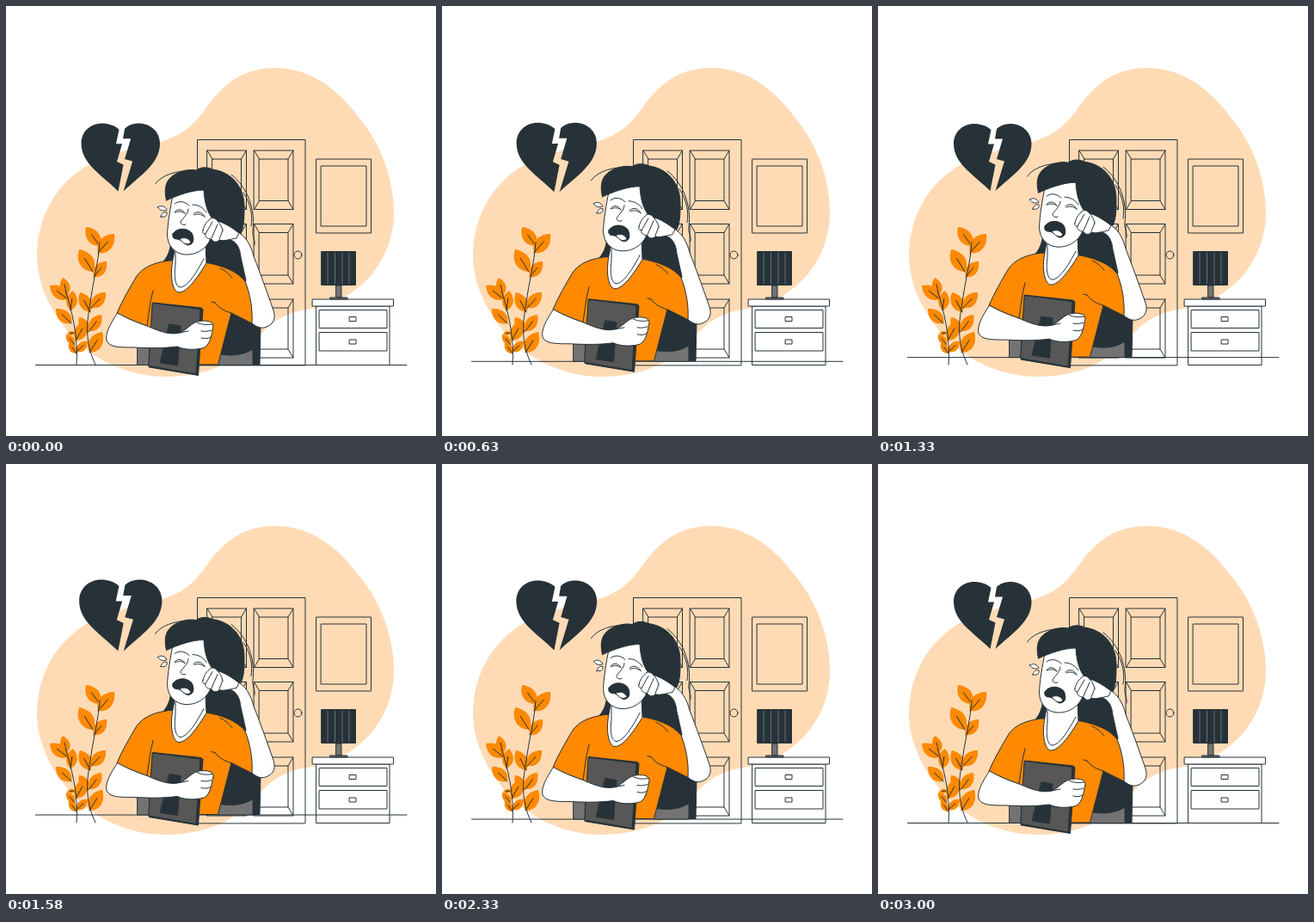
Write an HTML page that moves like this. It is 500x500 px and loops after 3.04 s.

```html
<!DOCTYPE html>
<html lang="en">
<head>
<meta charset="utf-8">
<title>Heartbroken</title>
<style>
  html, body { margin: 0; width: 100%; height: 100%; overflow: hidden; background: #fff; }
  svg { display: block; width: 100%; height: 100%; }
  .ln { fill: none; stroke: #263238; stroke-width: 1; stroke-linecap: round; stroke-linejoin: round; }
  .w { fill: #fff; }
  .o { fill: #ff8900; }
  .d { fill: #263238; }
  .g { fill: #737373; }
</style>
</head>
<body>
<svg viewBox="0 0 500 500">
  <path fill="#ffdbb5" d="M313 72C268 72 247 99 231 121C213 146 196 154 171 160C140 167 112 175 90 188C54 212 36 250 36 291C36 326 56 363 82 389C109 416 149 431 184 431C222 431 250 421 270 406C299 383 306 360 350 353C412 344 451 295 451 240C451 204 438 163 410 129C383 93 351 72 313 72Z"/>

  <g id="door" class="ln">
    <path d="M222.5 417.5V155.5H348V417.5Z"/>
    <circle cx="339.5" cy="289.5" r="4.5"/>
  </g>

  <g class="ln">
    <path d="M361 178H424.5V264H361ZM366.500 186H419V256H366.500Z"/>
    <path class="w" d="M361 349H446V417.500H361Z"/>
    <path class="w" d="M356.500 341H450.500V349H356.500Z"/>
    <path class="w" d="M364.500 353.500H443V374.500H364.500ZM364.500 379.500H443V401H364.500Z"/>
    <path d="M399.500 361.500H407V366.500H399.500ZM399.500 388H407V393H399.500Z"/>
    <path class="g" d="M384 325H390V339H384ZM377 339H397V341H377Z"/>
    <path class="d" d="M367 285.500H406.500V324.500H367Z"/>
    <path stroke="#607078" style="stroke:#607078" d="M374 287V323M382.500 287V323M391 287V323M399 287V323"/>
  </g>

  <g id="plants"></g>

  <g id="heart" class="d">
    <path d="M131.500 144C126 139 119 137 112 137C98 137 88 147 88 160C88 183 110 195 130.500 215L136.500 184.500L129 181L135 160.500H128Z"/>
    <path d="M138 143C142 139 148 137 154 137C168 137 178.500 147 178.500 160C178.500 183 157 196 136.500 215L147 180.500L138 178L145 154.500H136Z"/>
  </g>

  <g id="woman" class="ln">
    <path d="M34.500 417.500H466"/>
    <!-- chair -->
    <path class="g" d="M153 394L167 390V417.500H153Z"/>
    <path class="d" d="M262 356L296 372L295 417H287V399C277 406 260 408 246 404Z"/>
    <path class="g" d="M246 404C260 408 277 406 287 399V417.500H246Z"/>
    <!-- hair behind -->
    <path class="d" d="M192 268C192 282 189 290 183 297L198 300L197 276Z"/>
    <path class="d" d="M230 250L274 255C268 272 270 285 277 300C280 308 281 316 279 322L229 301Z"/>
    <!-- raised forearm -->
    <path class="w" d="M258 271C268 273 272 281 273 292L279 319L262 352L284 367C290 373 297 376 303 373C311 370 314 363 311 354C303 331 295 309 288 291C285 279 279 267 268 262Z"/>
    <!-- shirt -->
    <path class="o" d="M190 296C172 298 159 304 152 314C143 329 135 343 129 357C140 363 152 368 164 372L168 417H246.500L262 357L286 369C287 352 284 335 278 320C269 308 250 301 230 298Z"/>
    <path d="M243 345C248 352 255 355 262 357M243 345L239 344M164 372C166 359 167 345 171 331M263 316C258 310 254 307 249 305"/>
    <!-- neck -->
    <path class="w" d="M194 295C190 316 194 332 201 333C211 333 223 315 233 299L232 276L197 280Z"/>
    <path d="M197 286V301C195 316 197 327 203 327C212 326 222 309 230 294"/>
    <!-- face -->
    <path class="w" d="M194 220C191 235 188 253 187.500 266C188 280 197 288 208 289C224 290 237 279 239 266L242 240L231 210Z"/>
    <path d="M196 240C199 235 205 236 208 241M197 240C201 238 205 239 208 241M218 242C222 238 228 239 231 245M219 243C223 241 227 242 231 245"/>
    <path d="M196 230C201 226 208 227 213 232M217 231C224 231 230 235 233 240M212 236C212 242 205 247 203 251C203 254 206 255 209 254"/>
    <path class="d" d="M194 265C198 258 210 257 216 264C219 270 219 277 212 278C207 278 206 272 199 271C195 271 193 269 194 265Z"/>
    <path class="w" d="M202 271C207 268 213 270 215 275C212 278 208 277 206 275Z"/>
    <!-- hair -->
    <path class="d" d="M186.500 226C184 215 185 207 190 201C197 193 211 189 221 191C226 187 235 187 240 190C263 193 277 211 277 233C277 246 277 256 273 264L244 252C236 244 231 233 230 214C216 214 200 220 186.500 226Z"/>
    <path d="M173.500 207C181 196 201 190 222 192M262 196C281 211 290 236 287 261C286 268 290 270 289 278M276 217C285 230 287 244 285 256"/>
    <!-- tears -->
    <path class="w" d="M176.500 234C180 231 185 233 187 237C183 239 179 238 176.500 234ZM180 245C181 241 184 239 187 240C188 244 184 246 180 245Z"/>
    <!-- fist -->
    <path class="w" d="M229 261C230 256 233 251 236 249C238 245 243 246 246 250C254 252 263 258 271 264L268 270C261 271 253 274 248 272C245 276 240 274 239 271C234 271 231 268 232 265C229 265 228 263 229 261Z"/>
    <path d="M240 251L232 265M246 254L239 270M252 261L248 271M246 250C249 253 251 257 252 261"/>
    <!-- laptop -->
    <path class="d" d="M171 345L227 351L229 353L223.500 429.500L166.500 420Z"/>
    <path d="M170.500 345.500L226 352.500L221 428L166 418.500Z" fill="#575757" style="fill:#575757"/>
    <path class="d" d="M190 370L203 372L199.500 418L179.500 415Z"/>
    <!-- lower arm -->
    <path class="w" d="M129.500 357C121 370 115 381 117 389C120 397 132 397 149 397C169 398 183 398 199 396C208 400 219 400 228 398C236 397 239 385 241 372C241 366 231 365 222 367C214 370 210 377 202 380C190 383 178 378 164 372C152 368 140 363 129.500 357Z"/>
    <path d="M222 368C228 371 234 371 240 370M227 378C232 379 236 378 239 377M227 386C231 387 235 387 238 385M202 380L212 378"/>
  </g>
</svg>
<script>
const PERIOD = 3000, LOOP = 3040, BEAT = 1500, LIFT = 10;
const byId = id => document.getElementById(id);
const path = (d, cls) => `<path class="${cls}" d="${d}"/>`;

// Bevelled door panel: outer frame, inner frame and mitred corners.
function panel(x, y, h) {
  const w = 45.5, ix = 6, iy = 10, r = x + w, b = y + h;
  return path(`M${x} ${y}H${r}V${b}H${x}ZM${x + ix} ${y + iy}H${r - ix}V${b - iy}H${x + ix}Z` +
    `M${x} ${y}l${ix} ${iy}M${r} ${y}l${-ix} ${iy}M${x} ${b}l${ix} ${-iy}M${r} ${b}l${-ix} ${-iy}`, 'ln');
}
byId('door').innerHTML += [234, 288.5].map(x =>
  panel(x, 168, 68.5) + panel(x, 253.5, 69.5) + panel(x, 341, 68)).join('');

// Leaf from its base to its tip, bulging to both sides, with a midrib.
function leaf([x, y, tx, ty]) {
  const dx = tx - x, dy = ty - y;
  const at = (along, side) => `${x + dx * along - dy * side} ${y + dy * along + dx * side}`;
  return path(`M${x} ${y}C${at(.25, .4)} ${at(.7, .34)} ${tx} ${ty}C${at(.75, -.3)} ${at(.3, -.42)} ${x} ${y}Z`, 'o') +
    path(`M${x} ${y}L${at(.6, 0)}`, 'ln');
}
const leaves = [
  [109, 279, 93, 257], [107, 287, 126, 265], [101, 309, 85, 283], [102, 315, 117, 297],
  [98, 356, 86, 333], [99, 351, 116, 333], [96, 379, 85, 362], [97, 378, 111, 359],
  [97, 403, 112, 379],
  [71, 336, 66, 316], [72, 341, 51, 325], [75, 354, 78, 331], [76, 369, 58, 352],
  [80, 380, 71, 381], [81, 389, 94, 366], [80, 394, 70, 382], [82, 404, 73, 392], [82, 402, 95, 390]
];
byId('plants').innerHTML = leaves.map(leaf).join('') +
  path('M104 417C91 390 94 367 98 345C101 321 107 301 109 275', 'ln') +
  path('M82 417C84 390 79 365 72 340L69 331', 'ln');

// Two short beats, then a rest.
function heartScale(ms) {
  const p = (ms % BEAT) / BEAT;
  const bump = peak => Math.max(0, 1 - Math.abs(p - peak) / .1);
  return 1 + .1 * (bump(.1) + bump(.5));
}

function draw(ms) {
  const t = Math.min(ms % LOOP, PERIOD);
  const lift = LIFT * (1 - Math.abs(1 - 2 * t / PERIOD));
  const scale = t < PERIOD - 40 ? heartScale(t + 15) : 1;
  byId('woman').setAttribute('transform', `translate(0 ${-lift})`);
  byId('heart').setAttribute('transform', `translate(133 176) scale(${scale}) translate(-133 -176)`);
}

const start = performance.now();
function tick() {
  draw(performance.now() - start);
  requestAnimationFrame(tick);
}
tick();
</script>
</body>
</html>
```
